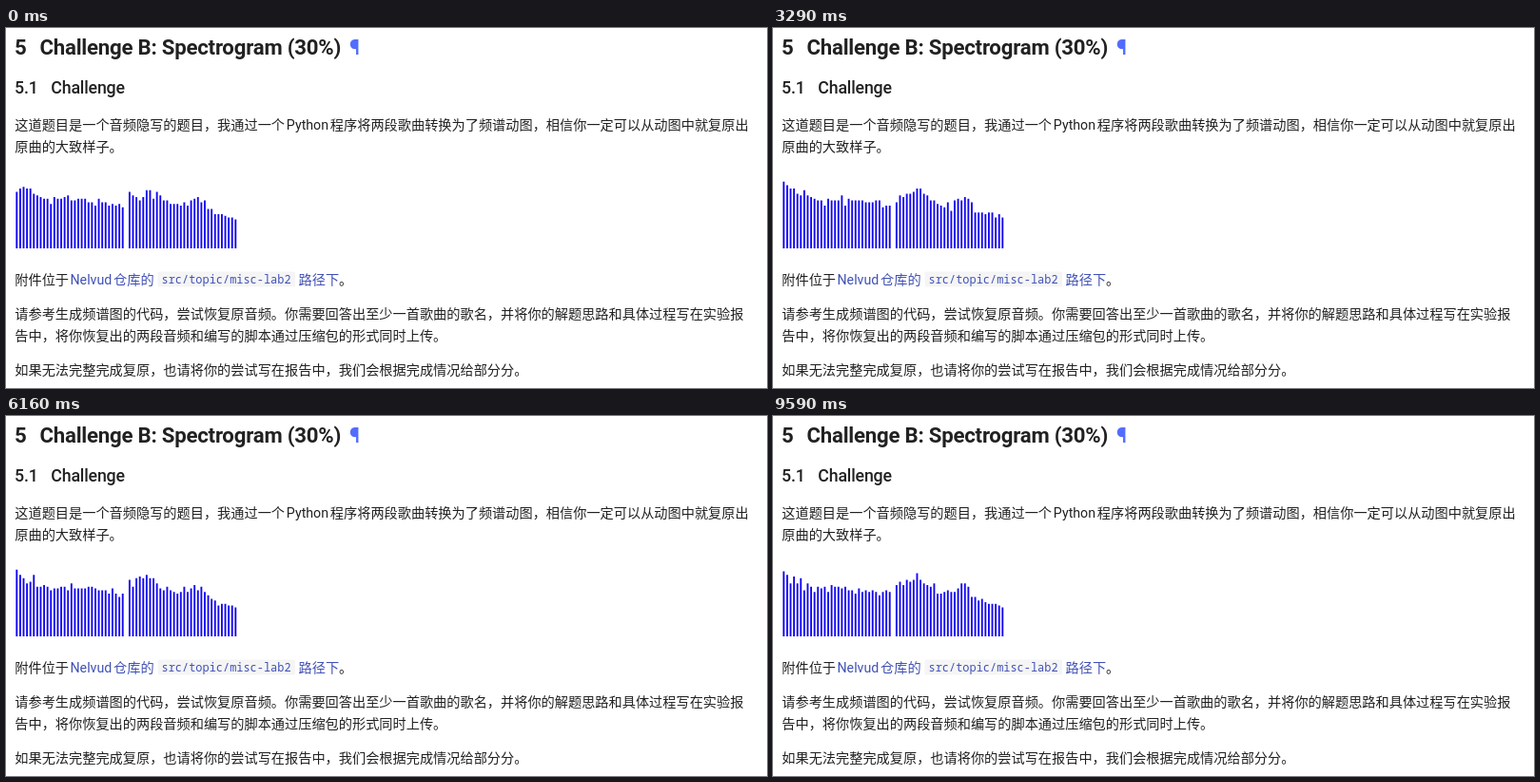
An HTML page for the animation above (9660 ms loop, 800x379 px).

```html
<!DOCTYPE html>
<html lang="zh-CN">
<head>
<meta charset="utf-8">
<title>Spectrogram</title>
<style>
  html, body { margin: 0; width: 100%; height: 100%; overflow: hidden; background: #fff; }
  svg { display: block; width: 800px; height: 379px; }
  text { font: 14.2px Roboto, "Noto Sans CJK SC", "Noto Sans CJK", sans-serif; fill: #212121; }
  .h2 { font-size: 22.19px; font-weight: 600; letter-spacing: -.01em; }
  .h3 { font-size: 17.75px; font-weight: 500; letter-spacing: -.01em; }
  .link { fill: #4051b5; }
  .code { font: 11.95px "Noto Sans Mono", "DejaVu Sans Mono", monospace; }
  .mark { fill: #526cfe; }
</style>
</head>
<body>
<svg viewBox="0 0 800 379">
  <text class="h2" x="9" y="27.9">5</text>
  <text class="h2" x="35.5" y="27.9">Challenge B: Spectrogram (30%)</text>
  <text class="h2 mark" x="361" y="27.9">¶</text>
  <text class="h3" x="9" y="69.2">5.1</text>
  <text class="h3" x="47.3" y="69.2">Challenge</text>
  <text x="9.3" y="107">这道题目是一个音频隐写的题目，我通过一个<tspan dx="1.8">Python</tspan><tspan dx="1.8">程序将两段歌曲转换为了频谱动图，相信你一定可以从动图中就复原出</tspan></text>
  <text x="9.3" y="130">原曲的大致样子。</text>
  <path id="bars" stroke="#1408f0" stroke-width="1.9"/>
  <text x="9.3" y="269.5">附件位于</text>
  <text class="link" x="67.5" y="269.5">Nelvud</text>
  <text class="link" x="113" y="269.5">仓库的</text>
  <rect x="159.5" y="256.5" width="144.5" height="16" rx="1.5" fill="#f5f5f5"/>
  <text class="link code" x="163.5" y="269">src/topic/misc-lab2</text>
  <text class="link" x="307.5" y="269.5">路径下</text>
  <text x="350" y="269.5">。</text>
  <text x="9.3" y="305.7">请参考生成频谱图的代码，尝试恢复原音频。你需要回答出至少一首歌曲的歌名，并将你的解题思路和具体过程写在实验报</text>
  <text x="9.3" y="328.7">告中，将你恢复出的两段音频和编写的脚本通过压缩包的形式同时上传。</text>
  <text x="9.3" y="365.3">如果无法完整完成复原，也请将你的尝试写在报告中，我们会根据完成情况给部分分。</text>
</svg>
<script>
const STEP = 70, STEPS = 138;
const COUNT = 32, FIRST = 11.3, PITCH = 3.594, BASE = 232, LEVEL = 1.8;

const bump = (i, center, width) => Math.exp(-(((i - center) / width) ** 2));

// Mean height in pixels of bar i in each channel
const leftMean = i => 51 + 17 * Math.exp(-i / 5) - 7 * (i / 31) ** 4;
const rightMean = i => 56 - 0.8 * i + 9 * bump(i, 6, 4) + 14 * bump(i, 20, 3);

// Repeatable value from -1 to 1
function noise(a, b) {
  const v = Math.sin(a * 127.1 + b * 311.7) * 43758.5453;
  return 2 * (v - Math.floor(v)) - 1;
}

function channel(mean, slot, step) {
  let d = "";
  for (let i = 0; i < COUNT; i++) {
    const n = noise(slot + i, step);
    const calm = 1 - 0.6 * i / COUNT; // high bands move less
    const height = mean(i) + calm * (3 * n + 6 * n ** 3);
    d += `M${FIRST + (slot + i) * PITCH} ${BASE}v${-Math.round(height / LEVEL) * LEVEL}`;
  }
  return d;
}

const bars = document.getElementById("bars");
function draw() {
  let step = Math.floor(performance.now() / STEP) % STEPS;
  if (step === 1 || step === 71) step--; // two steps are held twice as long
  bars.setAttribute("d", channel(leftMean, 0, step) + channel(rightMean, COUNT + 1, step));
  requestAnimationFrame(draw);
}
draw();
</script>
</body>
</html>
```
